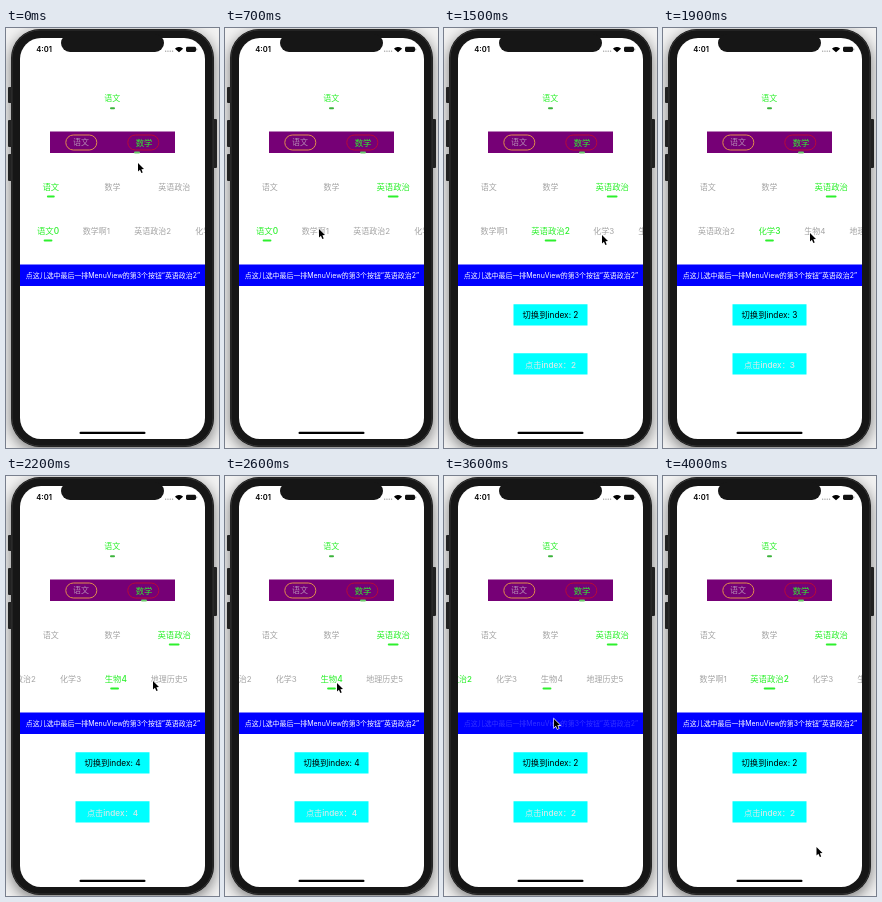
These frames come from a looping animation (213 by 420 pixels, 4100 ms). An HTML page with a canvas:

```html
<!DOCTYPE html>
<html lang="zh">
<head>
<meta charset="utf-8">
<style>
html, body { margin: 0; width: 100%; height: 100%; overflow: hidden; background: #f2f2f2; }
canvas { display: block; width: 213px; height: 420px; }
</style>
</head>
<body>
<canvas></canvas>
<script>
const LOOP = 4100, STEP = 100, MOVE = 300;
const LEFT = 14, WIDTH = 185, MID = LEFT + WIDTH / 2;
const GREEN = '#2df02d', GRAY = '#a4a4a4';
const FONT = 'Inter, "Noto Sans CJK SC", "Noto Sans CJK", sans-serif';

const canvas = document.querySelector('canvas');
const ctx = canvas.getContext('2d');
const ratio = window.devicePixelRatio || 1;
canvas.width = 213 * ratio;
canvas.height = 420 * ratio;

const clamp = v => Math.min(1, Math.max(0, v));
const mix = (a, b, k) => a + (b - a) * k;
const ease = v => { const k = clamp(v); return k * k * (3 - 2 * k); };

function textWidth(text) {
  ctx.font = `8px ${FONT}`;
  return ctx.measureText(text).width;
}

// Three equal columns
function columns(names) {
  const cell = WIDTH / names.length;
  return names.map((text, i) => ({ text, w: textWidth(text), x: LEFT + cell * (i + 0.5) }));
}

// Labels in a row with equal gaps
function flow(names, x, gap) {
  return names.map(text => {
    const w = textWidth(text);
    const item = { text, w, x: x + w / 2 };
    x += w + gap;
    return item;
  });
}

const subjects = { y: 159, items: columns(['语文', '数学', '英语政治']) };
const scroller = {
  y: 203, scrolls: true,
  items: flow(['语文0', '数学啊1', '英语政治2', '化学3', '生物4', '地理历史5'], 31.5, 24.2)
};

// Pointer stops, some of which pick a menu item
const taps = [
  { at: 0, x: 132, y: 135 },
  { at: 350, x: 167, y: 160, menu: subjects, pick: 2 },
  { at: 800, x: 94, y: 201, menu: scroller, pick: 1 },
  { at: 1150, x: 146, y: 206, menu: scroller, pick: 2 },
  { at: 1600, x: 158, y: 207, menu: scroller, pick: 3 },
  { at: 1950, x: 147, y: 205, menu: scroller, pick: 4 },
  { at: 2700, x: 112, y: 207, menu: scroller, pick: 4 },
  { at: 3580, x: 110, y: 243, menu: scroller, pick: 2 },
  { at: LOOP, x: 153.5, y: 371 }
];
const linkTap = taps[taps.length - 2].at;

// The latest pick of a menu and the one before it
function selection(menu, t) {
  const start = { at: -MOVE, pick: 0 };
  const done = taps.filter(tap => tap.menu === menu && tap.at <= t);
  const [before, now] = [start, start, ...done].slice(-2);
  return { at: now.at, now: now.pick, before: before.pick, touched: done.length > 0 };
}

function box(x, y, w, h, color, r = 0) {
  ctx.fillStyle = color;
  ctx.beginPath();
  ctx.roundRect(x, y, w, h, r);
  ctx.fill();
}

function outline(x, y, w, h, color, r) {
  ctx.strokeStyle = color;
  ctx.lineWidth = 1;
  ctx.beginPath();
  ctx.roundRect(x, y, w, h, r);
  ctx.stroke();
}

function label(text, x, y, size, color, weight = 400) {
  ctx.font = `${weight} ${size}px ${FONT}`;
  ctx.textAlign = 'center';
  ctx.fillStyle = color;
  ctx.fillText(text, x, y + size * 0.37);
}

function underline(x, y, w, color = GREEN) {
  box(x - w / 2, y - 1, w, 2, color, 1);
}

function drawPhone() {
  box(0, 0, 213, 420, '#f2f2f2');
  ctx.save();
  ctx.shadowColor = 'rgba(0,0,0,.5)';
  ctx.shadowBlur = 14 * ratio;
  ctx.shadowOffsetY = 4 * ratio;
  box(5, 1, 203, 418, '#161616', 29);
  ctx.restore();
  box(2, 59, 4, 16, '#222', 1);
  box(2, 92, 4, 27, '#222', 1);
  box(2, 126, 4, 27, '#222', 1);
  box(207, 91, 4, 49, '#222', 1);
  outline(6, 2, 201, 416, '#333', 28);
  box(LEFT, 10, WIDTH, 401, '#fff', 21);
  box(55, 6, 103, 18, '#161616', 9);
  box(73.5, 403.8, 66, 2.3, '#000', 1.1);
}

function drawStatus() {
  label('4:01', 38, 21.3, 7.6, '#000', 600);
  for (let i = 0; i < 4; i++) box(159 + i * 2.3, 22.5, 1.3, 1.3, '#999', 0.6);
  ctx.fillStyle = '#000';
  ctx.beginPath();
  ctx.moveTo(173, 24.3);
  ctx.arc(173, 24.3, 5.4, -Math.PI * 0.77, -Math.PI * 0.23);
  ctx.fill();
  box(180, 18.8, 10, 5.2, '#111', 1.4);
  box(190.3, 20.5, 0.9, 1.8, '#777');
}

function drawTabs(t) {
  label('语文', 106.3, 70, 8, GREEN, 500);
  underline(106.5, 80.3, 5, '#3cb43c');
  box(44, 103.5, 125, 21.5, '#760076');
  outline(59.8, 107, 31, 15, '#e08c4c', 7.5);
  label('语文', 75, 114.5, 8, '#b488b4');
  outline(121.8, 107, 31, 15, '#b80a38', 7.5);
  label('数学', 138, 114.5, 8.4, GREEN, 500);
  underline(mix(131, 138, ease(t / 200)), 124.6, 6, '#6ac86a');
}

function drawMenu(t, menu) {
  const { y, items, scrolls } = menu;
  const { at, now, before } = selection(menu, t);
  const k = ease((t - at) / MOVE);
  const lead = ease((t - at + 20) / MOVE);
  const offset = i => scrolls ? Math.max(0, items[i].x - MID) : 0;
  const bar = i => 5 + items[i].w * 0.18;
  const shift = mix(offset(before), offset(now), k);

  ctx.save();
  ctx.beginPath();
  ctx.rect(LEFT, y - 12, WIDTH, 24);
  ctx.clip();
  items.forEach(({ text, x }, i) => {
    const size = 8 + 0.4 * mix(i === before, i === now, k);
    const on = i === now;
    label(text, x - shift, y, size, on ? GREEN : GRAY, on ? 500 : 400);
  });
  underline(mix(items[before].x, items[now].x, lead) - shift, y + 9.6,
            mix(bar(before), bar(now), lead));
  ctx.restore();
}

function drawButtons(t) {
  box(LEFT, 236.5, WIDTH, 21.5, '#00f');
  ctx.globalAlpha = t < linkTap - STEP ? 1 : mix(0.2, 1, clamp((t - linkTap - 20) / MOVE));
  label('点这儿选中最后一排MenuView的第3个按钮“英语政治2”', MID + 0.4, 247.3, 6.95, '#fff');
  ctx.globalAlpha = 1;

  const { now, before, touched } = selection(scroller, t);
  if (!touched) return;
  const message = now === before ? `重复选中index：${now}` : `切换到index: ${now}`;
  box(69.5, 276.3, 74, 21.3, '#0ff');
  label(message, MID, 287, 8.3, '#000');
  box(69.5, 325.3, 74, 21.3, '#0ff');
  label(`点击index：${now}`, MID, 336.5, 8.2, '#d6eaea', 500);
}

const arrow = new Path2D('M0 0V8.5L1.9 6.8 3.4 10 4.7 9.4 3.4 6.3 6 6.1Z');

function drawPointer(t) {
  const i = taps.findLastIndex(tap => tap.at <= t);
  const a = taps[i], b = taps[i + 1];
  const travel = Math.min(MOVE, b.at - a.at - STEP);
  const k = ease(1 - (b.at - STEP - t) / travel);
  ctx.save();
  ctx.translate(mix(a.x, b.x, k), mix(a.y, b.y, k));
  ctx.strokeStyle = '#fff';
  ctx.lineWidth = 1.3;
  ctx.stroke(arrow);
  ctx.fillStyle = '#000';
  ctx.fill(arrow);
  ctx.restore();
}

function frame() {
  const t = Math.floor(performance.now() % LOOP / STEP) * STEP;
  ctx.setTransform(ratio, 0, 0, ratio, 0, 0);
  drawPhone();
  drawStatus();
  drawTabs(t);
  drawMenu(t, subjects);
  drawMenu(t, scroller);
  drawButtons(t);
  drawPointer(t);
  requestAnimationFrame(frame);
}
frame();
</script>
</body>
</html>
```
